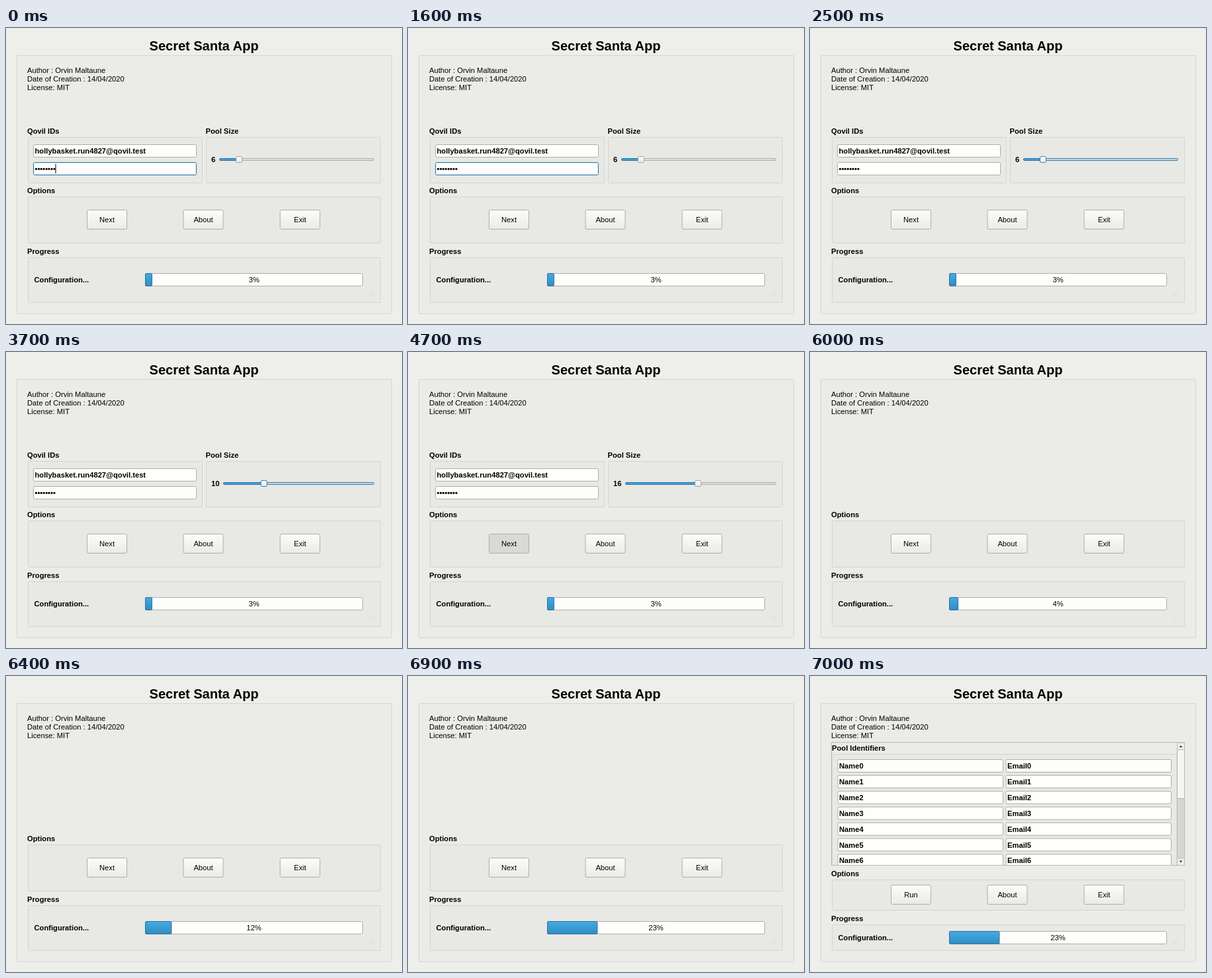
These frames come from a looping animation (598x448 px, 8000 ms). An HTML page:

```html
<!DOCTYPE html>
<html lang="en">
<head>
<meta charset="utf-8">
<title>Secret Santa App</title>
<style>
  html, body { margin: 0; width: 100%; height: 100%; overflow: hidden; background: #eeeeea; }
  svg { display: block; font: 11.2px "Liberation Sans", Arial, sans-serif; white-space: pre; }
  .b { font-weight: bold; }
  .m { text-anchor: middle; }
</style>
</head>
<body>
<svg width="598" height="448" viewBox="0 0 598 448">
  <defs>
    <linearGradient id="button" x2="0" y2="1"><stop stop-color="#fcfcfa"/><stop offset="1" stop-color="#eaeae7"/></linearGradient>
    <linearGradient id="blue" x2="0" y2="1"><stop stop-color="#43ace0"/><stop offset="1" stop-color="#318cc4"/></linearGradient>
    <clipPath id="view"><rect x="33" y="101" width="521" height="185"/></clipPath>
  </defs>
  <g id="stage"></g>
</svg>
<script>
const LOOP = 8000, TICK = 100;
const EDGE = '#adada9', FOCUS = '#3a7aa8', DARK_BLUE = '#2b6f9f';
const stage = document.getElementById('stage');

const clamp = (v, lo, hi) => Math.min(hi, Math.max(lo, v));
const rect = (x, y, w, h, fill, stroke = 'none', r = 0) =>
  `<rect x="${x}" y="${y}" width="${w}" height="${h}" rx="${r}" fill="${fill}" stroke="${stroke}"/>`;
const text = (x, y, s, cls = '') => `<text x="${x}" y="${y}" class="${cls}">${s}</text>`;
const bold = (x, y, s) => text(x, y, s, 'b');
const group = (x, y, w, h) => rect(x, y, w, h, '#e8e8e4', '#d3d3cf', 1);
const field = (x, y, w, s, focused) =>
  rect(x, y, w, 19, '#fefefc', focused ? FOCUS : EDGE, 2) +
  (focused ? rect(x + 1, y + 1, w - 2, 17, 'none', '#d3e7f3', 1) : '') +
  bold(x + 2, y + 13.5, s);
const button = (cx, y, s, pressed) =>
  rect(cx - 30, y, 60, 29, pressed ? '#d9d9d6' : 'url(#button)', EDGE, 2) +
  text(cx, y + 18.5, s, 'm');

function slider(value, focused) {
  const min = 3, max = 30, right = 556;
  const left = value < 10 ? 322 : 328;
  const x = left + 5 + (right - left - 10) * (value - min) / (max - min);
  return bold(310, 203, value) +
    rect(left + .5, 197.5, right - left - 1, 3, focused ? '#c4dcea' : '#dededa', focused ? FOCUS : EDGE, 1.5) +
    rect(left + .5, 197.5, x - left, 3, '#3fa6dc', DARK_BLUE, 1.5) +
    rect(x - 4.5, 194.5, 9, 9, 'url(#button)', focused ? FOCUS : '#a0a09c', 2);
}

function setupPage(t) {
  const typing = t < 2100;
  const cursor = t < 300 || (t >= 1000 && t < 1600);
  const value = t < 3700 ? 6 : clamp(10 + 2 * Math.floor((t - 3700) / TICK), 10, 16);
  return bold(32, 160, 'Qovil IDs') + group(33.5, 165.5, 263, 69) +
    field(41.5, 176.5, 246, 'hollybasket.run4827@qovil.test') +
    field(41.5, 203.5, 246, '•'.repeat(8), typing) +
    (cursor ? rect(74.5, 206, 1, 14, '#000') : '') +
    bold(301.5, 160, 'Pool Size') + group(302.5, 165.5, 263, 69) +
    slider(value, !typing && t < 4700);
}

function poolPage() {
  let rows = '';
  for (let i = 0; i < 7; i++) {
    const y = 126.5 + 23.9 * i;
    rows += field(42, y, 249.5, 'Name' + i) + field(296, y, 249.5, 'Email' + i);
  }
  return `<g clip-path="url(#view)">${bold(33, 113, 'Pool Identifiers')}${group(33.5, 118.5, 520.5, 190)}${rows}</g>` +
    rect(554.5, 101, 11, 185, '#d6d6d2', '#bcbcb8') +
    rect(554.5, 101, 11, 10.5, '#efefec', '#bcbcb8') +
    rect(554.5, 111.5, 11, 74, '#f4f4f1', '#b4b4b0') +
    rect(554.5, 276, 11, 10.5, '#efefec', '#bcbcb8') +
    '<path d="M557.5 108h5l-2.5-3zM557.5 279.5h5l-2.5 3z" fill="#444"/>' +
    rect(32.5, 100.5, 533, 186, 'none', '#b8b8b4');
}

function progress(y, percent) {
  return rect(210.5, y, 328, 19, '#fefefc', EDGE, 2) +
    rect(210.5, y, 3.28 * percent, 19, 'url(#blue)', DARK_BLUE, 1.5) +
    text(374.5, y + 13.5, percent + '%', 'm') + bold(42.5, y + 13.5, 'Configuration...');
}

function sizeGrip() {
  let dots = '';
  for (let i = 0; i < 3; i++)
    for (let j = 0; j <= i; j++) dots += rect(554 - 3 * j, 398 + 3 * i + 0, 1, 1, '#cfcfcb');
  return dots;
}

function scene(t) {
  const pool = t >= 7000;
  const percent = t < 6000 ? 3 : Math.round(4 + 19 * clamp((t - 6000) / 900, 0, 1));
  const [optionsY, optionsH, buttonY, progressY, barY] =
    pool ? [308.5, 46, 316.5, 376.5, 386.5] : [255.5, 70, 275.5, 347.5, 371.5];
  return `<text x="299" y="34" class="b m" font-size="20">Secret Santa App</text>` +
    rect(16.5, 41.5, 566, 391, '#ebebe7', '#d5d5d1', 1) +
    text(32, 68, 'Author : Orvin Maltaune') +
    text(32, 80.7, 'Date of Creation : 14/04/2020') +
    text(32, 93.5, 'License: MIT') +
    (pool ? poolPage() : t < 6000 ? setupPage(t) : '') +
    bold(32, optionsY - 5.5, 'Options') + group(33.5, optionsY, 532, optionsH) +
    button(152.5, buttonY, pool ? 'Run' : 'Next', t >= 4700 && t < 4900) +
    button(298, buttonY, 'About') + button(444, buttonY, 'Exit') +
    bold(32, progressY - 6, 'Progress') + group(33.5, progressY, 532, 415.5 - progressY) +
    progress(barY, percent) + sizeGrip();
}

let shown = -1;
function frame(now) {
  const tick = Math.floor(now % LOOP / TICK);
  if (tick !== shown) stage.innerHTML = scene((shown = tick) * TICK);
  requestAnimationFrame(frame);
}
frame(0);
</script>
</body>
</html>
```
